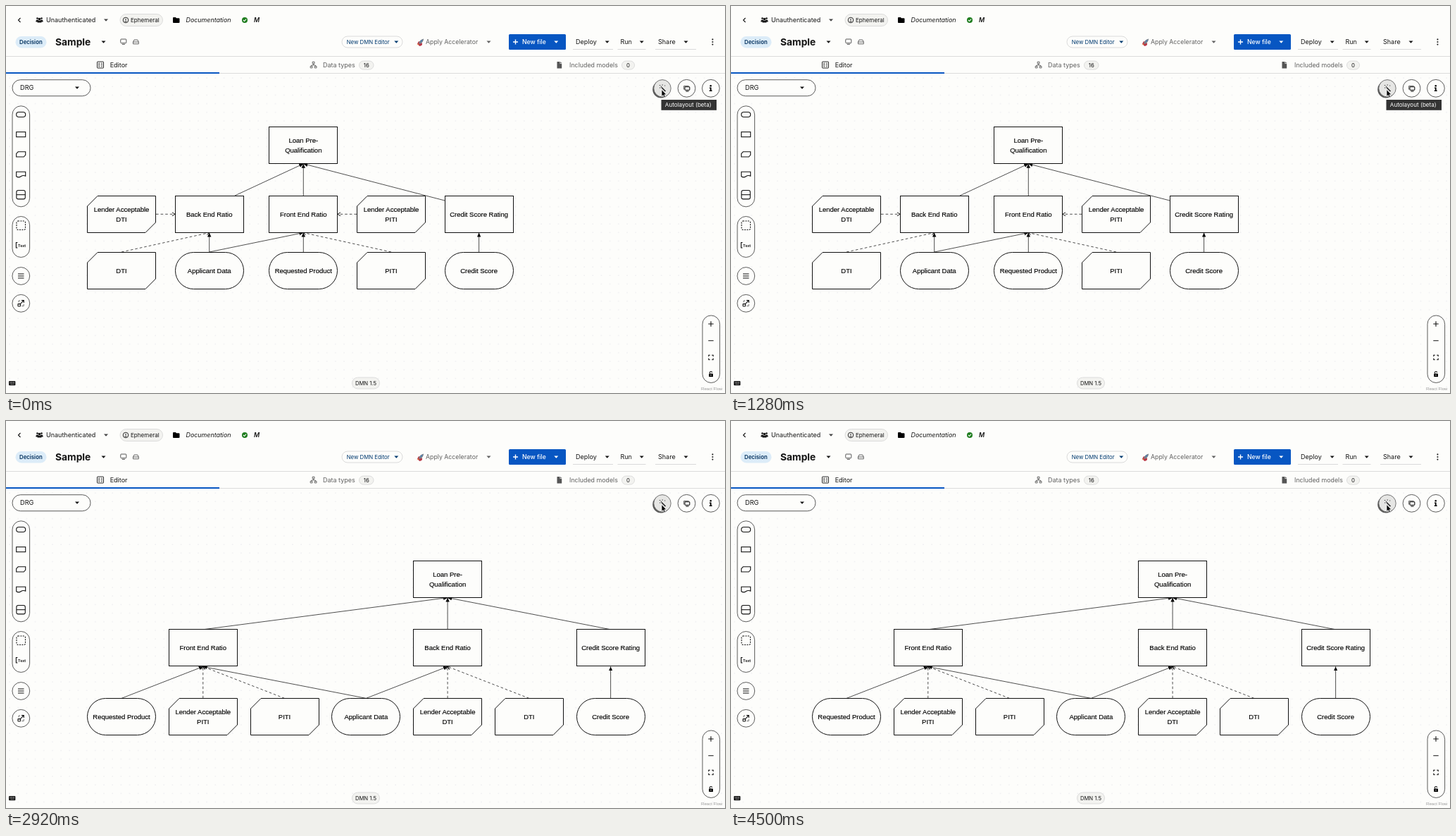
An HTML page for the animation above (4520 ms loop, 1021 by 549 pixels).

```html
<!DOCTYPE html>
<html lang="en">
<head>
<meta charset="utf-8">
<style>
  html, body { margin: 0; width: 100%; height: 100%; overflow: hidden; background: #fdfdfb; }
  svg { display: block; }
  text { font-family: Inter, sans-serif; fill: #151515; }
  .node text { font-family: "Liberation Sans", Arial, sans-serif; font-size: 9.5px; fill: #000; stroke: #000; stroke-width: .15px; text-anchor: middle; }
  .node path, .node rect { fill: #fdfdfb; stroke: #111; stroke-width: 1; }
  .edge { stroke: #222; stroke-width: .8; fill: none; }
  .dash { stroke-dasharray: 3.6 3; }
  .line { fill: none; stroke: #151515; stroke-width: 1.1; }
  .box { fill: #fdfdfb; stroke: #333; stroke-width: .8; }
  .pill { fill: #f3f3f0; stroke: #d5d5d5; stroke-width: .8; }
</style>
</head>
<body>
<svg id="stage" width="1021" height="549" viewBox="0 0 1021 549"></svg>
<script>
const LOOP = 4520, TIP_OFF = 1660, PRESS = 1800, RELEASE = 2160, RELAYOUT = 2200;
const W = 97, H = 52;
const BLUE = '#0756c2', GREY = '#606060';

const text = (x, y, s, size = 9, attrs = '') => `<text x="${x}" y="${y}" font-size="${size}" ${attrs}>${s}</text>`;
const rect = (x, y, w, h, r, attrs) => `<rect x="${x}" y="${y}" width="${w}" height="${h}" rx="${r}" ${attrs}/>`;
const circle = (x, y, r, attrs) => `<circle cx="${x}" cy="${y}" r="${r}" ${attrs}/>`;
const path = (d, attrs = 'class="line"') => `<path d="${d}" ${attrs}/>`;
const fill = c => `fill="${c}"`;
const caret = (x, y, c = '#151515') => path(`M${x - 3} ${y - 1.5}h6l-3 3.2z`, fill(c));

// x is a centre, y a top edge; outlines sit on whole pixels
function node(kind, x, y, ...lines) {
  const l = Math.floor(x - W / 2) + .5, t = Math.floor(y) + .5, c = 14.5;
  const shape = kind === 'know'
    ? path(`M${l + c} ${t}H${l + W}V${t + H - c}l${-c} ${c}H${l}V${t + c}z`, '')
    : rect(l, t, W, H, kind === 'input' ? H / 2 : 0, '');
  const first = y + H / 2 + 3.5 - (lines.length - 1) * 7;
  return `<g class="node">${shape}${lines.map((s, i) => text(x, first + i * 14, s, 9.5)).join('')}</g>`;
}
const edge = (x1, y1, x2, y2, dash) =>
  path(`M${x1} ${y1}L${x2} ${y2}`, `class="edge${dash ? ' dash' : ''}" marker-end="url(#${dash ? 'open' : 'solid'})"`);

function before() {
  const [a, b, c, d, e] = [164, 288.7, 422.3, 547, 671.6];
  const top = 171.2, mid = 269, low = 349, loan = top + H + .6, base = mid + H + .6;
  return edge(325, mid, c, loan) + edge(c, mid, c, loan) + edge(623, 276, c, loan)
    + edge(213, 295.3, 240, 295.3, 1) + edge(498, 295.3, 471, 295.3, 1)
    + edge(a, low, b, base, 1) + edge(b, low, b, base) + edge(b, low, c, base)
    + edge(c, low, c, base) + edge(d, low, c, base, 1) + edge(e, low, e, base)
    + node('decision', c, top, 'Loan Pre-', 'Qualification')
    + node('know', a, mid, 'Lender Acceptable', 'DTI') + node('decision', b, mid, 'Back End Ratio')
    + node('decision', c, mid, 'Front End Ratio') + node('know', d, mid, 'Lender Acceptable', 'PITI')
    + node('decision', e, mid, 'Credit Score Rating')
    + node('know', a, low, 'DTI') + node('input', b, low, 'Applicant Data')
    + node('input', c, low, 'Requested Product') + node('know', d, low, 'PITI') + node('input', e, low, 'Credit Score');
}

function after() {
  const col = i => 164 + 115.77 * i;
  const top = 198, mid = 295.8, low = 393.4, loan = top + H + .6, base = mid + H + .6;
  const up = (from, to, dash) => edge(col(from), low, col(to), base, dash);
  return [1, 4, 6].map(i => edge(col(i), mid, col(4), loan)).join('')
    + up(0, 1) + up(1, 1, 1) + up(2, 1, 1) + up(3, 1) + up(3, 4) + up(4, 4, 1) + up(5, 4, 1) + up(6, 6)
    + node('decision', col(4), top, 'Loan Pre-', 'Qualification')
    + node('decision', col(1), mid, 'Front End Ratio') + node('decision', col(4), mid, 'Back End Ratio')
    + node('decision', col(6), mid, 'Credit Score Rating')
    + node('input', col(0), low, 'Requested Product') + node('know', col(1), low, 'Lender Acceptable', 'PITI')
    + node('know', col(2), low, 'PITI') + node('input', col(3), low, 'Applicant Data')
    + node('know', col(4), low, 'Lender Acceptable', 'DTI') + node('know', col(5), low, 'DTI')
    + node('input', col(6), low, 'Credit Score');
}

const defs = `<defs>
  <pattern id="dots" width="12.18" height="12.18" x="4" y="101" patternUnits="userSpaceOnUse">${circle(1, 1, .55, fill('#d4d4de'))}</pattern>
  <marker id="solid" viewBox="0 0 6 6" refX="6" refY="3" markerWidth="6" markerHeight="6" markerUnits="userSpaceOnUse" orient="auto">${path('M0 .3L6 3L0 5.7z', fill('#000'))}</marker>
  <marker id="open" viewBox="0 0 6 6" refX="5.5" refY="3" markerWidth="6" markerHeight="6" markerUnits="userSpaceOnUse" orient="auto">${path('M1.5 .5L5.5 3L1.5 5.5', 'fill="none" stroke="#000" stroke-width=".9"')}</marker>
  <filter id="blur"><feGaussianBlur stdDeviation=".7"/></filter>
</defs>`;

function topBar() {
  const person = (x, y, r) => circle(x, y - 2, r, fill('#151515')) + path(`M${x - r * 1.6} ${y + 3}v-1q0-2 ${r * 1.6}-2t${r * 1.6} 2v1z`, fill('#151515'));
  return path('M20.5 17l-3 3l3 3')
    + person(44.5, 19.5, 1.3) + person(50.5, 19.5, 1.3) + person(47.5, 20.5, 1.8)
    + text(57, 23.2, 'Unauthenticated') + caret(142, 20, '#444')
    + rect(162, 11.5, 60.5, 17, 8.5, 'class="pill"') + circle(170, 20, 3.8, 'class="line" style="stroke-width:.9"')
    + path('M170 18v2.3M168.6 21.9h2.8', 'fill="none" stroke="#151515" stroke-width="1"') + text(177, 23, 'Ephemeral', 8.1)
    + path('M237 17q0-1 1-1h2.8l1.3 1.3h3.4q1 0 1 1v4.7q0 1-1 1h-7.5q-1 0-1-1z', fill('#000'))
    + text(255.5, 23.2, 'Documentation', 8.9, 'font-style="italic"')
    + circle(339, 20, 4, fill('#1f7d1f')) + path('M337 20l1.5 1.5l2.6-2.9', 'fill="none" stroke="#fff" stroke-width="1.1"')
    + text(352, 23.2, 'M', 8.8, 'font-style="italic" font-weight="600"');
}

function titleBar() {
  const menu = (x, label, cx, w) => text(x, 54.2, label) + caret(cx, 51) + path(`M${x - 4} 61.5h${w}`, 'stroke="#dadada" stroke-width="1"');
  return rect(13.5, 43, 44, 16.5, 8.2, fill('#dcecf8')) + text(19, 54, 'Decision', 7.8, 'font-weight="600" style="fill:#002f5d"')
    + text(70, 56, 'Sample', 13.8, 'font-weight="700"') + caret(138.5, 51)
    + rect(162.8, 47, 8, 5.6, .8, 'class="line" style="stroke:#444;stroke-width:.9"') + path('M164.7 54.3h4.2', 'stroke="#444" stroke-width="1"')
    + path('M180.5 51l1.5-3h4.8l1.5 3v2.8h-7.8zM180.5 51h7.8', 'fill="none" stroke="#555" stroke-width=".9"')
    + rect(477, 43, 86, 16, 8, 'fill="#fdfdfb" stroke="#d2d2d2" stroke-width=".8"')
    + text(483.7, 53.8, 'New DMN Editor', 7.8, 'style="fill:#003a70"') + caret(554.3, 51, '#003a70')
    + path('M584 54l1.5-3.4l2.6-.4l3 3l-.6 2.6l-3 1.2z', fill('#b93545')) + path('M586 52.5q2-5 7.2-6q-.8 5.2-5.4 7.6z', fill('#77808c'))
    + circle(590, 49.6, 1, fill('#3e86c8')) + path('M583.2 55.8l2.8-2.5l.8.8z', fill('#ef9a2d'))
    + text(596, 54.2, 'Apply Accelerator', 8.75, `style="fill:${GREY}"`) + caret(685.5, 51, GREY)
    + rect(714, 40, 81, 22, 1.5, fill(BLUE)) + path('M720 51h7M723.5 47.5v7', 'stroke="#fff" stroke-width="1.4"')
    + text(733, 54.2, 'New file', 8.7, 'font-weight="500" style="fill:#fff"') + caret(781.3, 51, '#fff')
    + menu(809, 'Deploy', 853.7, 57) + menu(872.5, 'Run', 902.7, 40) + menu(926, 'Share', 965.5, 58)
    + [47.4, 51, 54.6].map(y => circle(1003.4, y, 1.05, fill('#222'))).join('');
}

function tabs() {
  const badge = (x, w, s) => rect(x, 78, w, 12, 6, 'class="pill"') + text(x + w / 2, 86.9, s, 7.8, 'text-anchor="middle"');
  const soft = `style="fill:${GREY}"`;
  return path('M0 71.5H1021M303 95.5H1021', 'stroke="#dcdcdc" stroke-width="1"') + rect(0, 94, 303, 2, 0, fill(BLUE))
    + rect(129.5, 79, 9, 9, .6, 'class="line" style="stroke-width:.9"') + path('M131 81.3h2.5M135 81.3h2M131 83.5h2.5M135 83.5h2M131 85.8h2.5M135 85.8h2', 'stroke="#222" stroke-width=".9"')
    + text(147.7, 87.2, 'Editor')
    + path('M436.6 82v1.8M433.5 85.3q0-1.5 1.5-1.5h3.2q1.5 0 1.5 1.5M435.2 79.2h2.8v2.6h-2.8zM432.2 85.4h2.8v2.4h-2.8zM438.2 85.4h2.8v2.4h-2.8z', 'fill="none" stroke="#444" stroke-width=".8"')
    + text(450, 87.2, 'Data types', 9, soft) + badge(501.5, 20.5, 16)
    + path('M782.5 79h4v2.7h2.7v6.8h-6.7zM787.2 79l2 2h-2z', fill('#555'))
    + text(800, 87.2, 'Included models', 8.85, soft) + badge(874.5, 18, 0);
}

function tools() {
  const thin = 'fill="none" stroke="#111" stroke-width="1.1"';
  return rect(9, 104.7, 111, 23, 11.5, 'class="box"') + text(20, 119.3, 'DRG', 9.2) + caret(101, 116)
    + rect(9, 141.8, 24.6, 143, 12.3, 'class="box"')
    + rect(14.7, 150.5, 13, 7, 3.5, thin) + rect(14.7, 178.7, 13, 7, 0, thin)
    + path('M17.2 206.8h10.5v4.6l-2.4 2.6h-10.6v-4.6z', thin)
    + path('M14.7 235.2h13v6q-3.3-1.6-6.5 .6t-6.5 0z', thin)
    + rect(14.9, 261.5, 12.4, 12.4, 2.5, thin) + path('M14.9 267.7h12.4', thin)
    + rect(9, 298.5, 24.6, 58, 12.3, 'class="box"')
    + rect(15, 305, 12.5, 12.5, 2, `${thin} stroke-dasharray="2 1.4"`)
    + path('M16.4 335.5h-2v7.5h2', thin) + text(17, 341.6, 'Text', 5.4, 'font-weight="600"')
    + circle(21.3, 383, 12.4, 'class="box"') + path('M17 380h8.5M17 383h8.5M17 386h8.5', thin)
    + circle(21.3, 421.8, 12.4, 'class="box"')
    + rect(17, 422.6, 3.4, 3.4, .4, thin) + path('M19.8 423.2l5-5M22 417.6h3.3v3.3', thin)
    + path('M18 420.5v-2.5h2.2M25.2 422.8v2.8h-3', 'fill="none" stroke="#555" stroke-width=".8"');
}

function controls() {
  const thin = 'fill="none" stroke="#111" stroke-width="1.1"';
  return circle(966.5, 116.8, 12.4, 'class="box"') + path('M962.6 118.5v-5h7', 'fill="none" stroke="#333" stroke-width=".8"')
    + rect(964, 114.8, 6.8, 4.4, .6, thin) + path('M965.3 121h4.2', thin)
    + circle(1000.9, 116.8, 12.4, 'class="box"') + circle(1000.7, 113.3, 1.3, fill('#000'))
    + path('M999 115.5h2.6v4h1v1.6h-3.8v-1.6h1v-2.4h-.8z', fill('#000'))
    + rect(989, 439, 24.6, 95.5, 12.3, 'class="box"')
    + path('M997.3 451h7.4M1001 447.3v7.4M997.3 474.8h7.4', thin)
    + path('M997.8 497.3v-2h2M1002.2 495.3h2v2M1004.2 499.8v2h-2M999.8 501.8h-2v-2', thin)
    + rect(998.2, 521.6, 5.8, 4.4, .6, fill('#000')) + path('M999.4 521.5v-1.4q0-1.6 1.6-1.6t1.6 1.4', thin) + circle(1001, 523.8, .7, fill('#fff'))
    + text(987, 545.2, 'React Flow', 6.1, 'style="font-family:\'Liberation Sans\',Arial,sans-serif;fill:#999"')
    + rect(491.5, 527, 39, 16, 8, 'class="pill"') + text(511, 537.9, 'DMN 1.5', 7.7, 'text-anchor="middle"')
    + rect(4, 532, 9.4, 6.2, 1, fill('#111'))
    + path('M5.3 533.6h7M5.3 535h7M6.6 536.7h4.4', 'stroke="#fff" stroke-width=".6" stroke-dasharray="1 .6"');
}

function autolayout() {
  return circle(930.4, 118.4, 12.2, 'fill="#333" opacity=".8" filter="url(#blur)"')
    + circle(932, 116.8, 12.2, 'id="button" stroke="#555" stroke-width=".8"')
    + path('M931 115.5l5.5 5.5', 'stroke="#222" stroke-width="1.5"')
    + path('M927.8 112.5h1.5M931.5 112h1.5M928 116h1.3M935 113h1.2M930 114l1 1', 'stroke="#444" stroke-width="1.1"')
    + `<g id="tip">${rect(930.5, 133, 78.5, 14.8, 0, fill('#333'))}${text(935.8, 143.3, 'Autolayout (beta)', 8.1, 'style="fill:#fff"')}</g>`
    + path('M931 118.6v9.8l2.2-2l1.5 3.6l1.7-.7l-1.5-3.5h3z', 'fill="#000" stroke="#fff" stroke-width=".7"');
}

const $ = id => document.getElementById(id);
$('stage').innerHTML = defs + rect(0, 96, 1021, 453, 0, fill('url(#dots)'))
  + topBar() + titleBar() + tabs()
  + `<g id="before">${before()}</g><g id="after">${after()}</g>`
  + tools() + controls() + autolayout();

const show = (id, on) => $(id).setAttribute('visibility', on ? 'visible' : 'hidden');

function draw(now) {
  const t = now % LOOP;
  show('tip', t < TIP_OFF);
  show('before', t < RELAYOUT);
  show('after', t >= RELAYOUT);
  $('button').setAttribute('fill', t >= PRESS && t < RELEASE ? '#d2d2d2' : '#e6e6e4');
  requestAnimationFrame(draw);
}
draw(performance.now());
</script>
</body>
</html>
```
